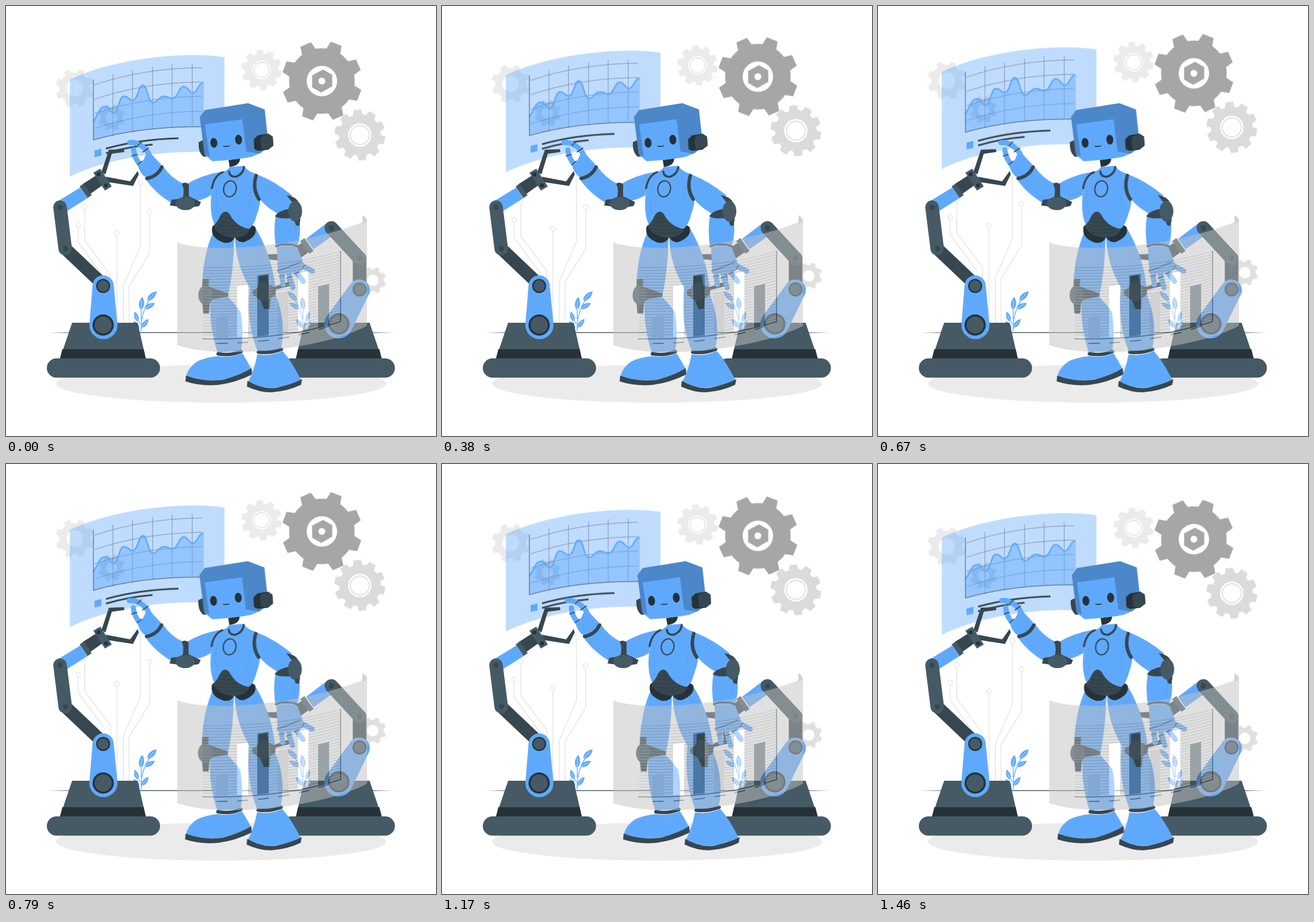
Write an HTML page without scripts that moves like this. It is 748x748 px and loops after 1.5 s.

```html
<!DOCTYPE html>
<html lang="en">
<head>
<meta charset="utf-8">
<title>Robot factory</title>
<style>
html, body { margin: 0; width: 100%; height: 100%; overflow: hidden; background: #fff; }
svg { display: block; width: 100%; height: 100%; }
.float { animation: float 1.5s linear -24ms infinite; }
.shake { animation: shake 1.5s linear -24ms infinite; }
@keyframes float {
  0%, 100% { transform: translateY(.5px); }
  50% { transform: translateY(-14.5px); }
}
@keyframes shake {
  0%, 100% { transform: translateX(.3px); }
  10%, 90% { transform: translateX(-1.2px); }
  20%, 80% { transform: translateX(3.3px); }
  30%, 50%, 70% { transform: translateX(-5.7px); }
  40%, 60% { transform: translateX(6.3px); }
}
.blue { fill: #5fa9fd; }
.shade { fill: #4c87ca; }
.steel { fill: #455a64; }
.dark { fill: #37474f; }
.ink { fill: #263238; }
.line { fill: none; stroke: #263238; stroke-width: .8; }
.band { fill: none; stroke: #37474f; stroke-width: 6; stroke-linecap: round; }
.finger { fill: none; stroke: #5fa9fd; stroke-width: 9; stroke-linecap: round; stroke-linejoin: round; }
.seam { fill: none; stroke: #4c87ca; stroke-width: 1; stroke-dasharray: 2 4; }
.joint { fill: none; stroke: #37474f; stroke-width: 1.6; stroke-linecap: round; }
.thin { stroke-width: 3.5; }
.axis { stroke-width: 1.6; }
</style>
</head>
<body>
<svg viewBox="0 0 748 748">
<defs>
  <path id="bar" d="M-10-69.500H10L13-55V55L10 69.500H-10L-13 55V-55Z"/>
  <g id="gear8">
    <circle r="57"/>
    <use href="#bar" transform="rotate(21)"/><use href="#bar" transform="rotate(66)"/>
    <use href="#bar" transform="rotate(111)"/><use href="#bar" transform="rotate(156)"/>
  </g>
  <g id="gear10">
    <circle r="57"/>
    <use href="#bar"/><use href="#bar" transform="rotate(36)"/>
    <use href="#bar" transform="rotate(72)"/><use href="#bar" transform="rotate(108)"/>
    <use href="#bar" transform="rotate(144)"/>
  </g>
  <g id="holed"><use href="#gear8"/><circle r="30" fill="#fff"/></g>
  <g id="ringed">
    <use href="#gear10" transform="rotate(-6)"/><circle r="32" fill="#fff"/>
    <circle r="26" fill="none" stroke="#dbdbdb" stroke-width="2.5"/>
  </g>

  <g id="leaf">
    <path class="blue" d="M0 0C-6-5-6-15 1-23C6-15 6-6 0 0Z"/>
    <path d="M0 0V-17" stroke="#fff" stroke-width=".7"/>
  </g>
  <g id="plant">
    <path d="M235 566Q234 532 252 508M235 545Q236 530 234 520M235 562Q238 552 242 549M234 553Q229 547 226 541" fill="none" stroke="#5fa9fd" stroke-width="1.3"/>
    <use href="#leaf" transform="translate(246 513) rotate(42)"/>
    <use href="#leaf" transform="translate(235 529) rotate(3)"/>
    <use href="#leaf" transform="translate(241 527) rotate(58) scale(.9)"/>
    <use href="#leaf" transform="translate(230 549) rotate(-22) scale(.8)"/>
    <use href="#leaf" transform="translate(236 560) rotate(35) scale(.85)"/>
    <use href="#leaf" transform="translate(232 562) rotate(-38) scale(.75)"/>
  </g>

  <g id="base">
    <path class="steel" d="M-54 551H60L74 613H-75Z"/>
    <path class="ink" d="M-71 597H70.500L74 613H-75Z"/>
    <rect class="steel" x="-98" y="613" width="197" height="33.500" rx="16.700"/>
  </g>
  <g id="pivot"><circle class="ink" r="18.500"/><circle class="steel" r="15"/></g>

  <path id="rule" class="line" d="M343 455Q480 457 581 427"/>
  <g id="rules2"><use href="#rule"/><use href="#rule" y="5.100"/></g>
  <g id="rules4"><use href="#rules2"/><use href="#rules2" y="10.200"/></g>
  <g id="rules8"><use href="#rules4"/><use href="#rules4" y="20.400"/></g>

  <path id="gridline" d="M154 137Q240 108 341 107"/>
  <path id="wave" d="M152 200C160 190 162 175 172 175S181 186 187 186C196 186 196 157 205 157S214 165 221 164C230 162 230 138 238 138C247 138 246 168 256 168C264 168 266 157 274 157C282 156 284 161 290 161C299 160 301 140 309 140C317 140 319 152 326 151C334 149 334 134 344 133"/>
  <clipPath id="below"><path d="M152 100H344V210Q235 209 152 233Z"/></clipPath>
  <linearGradient id="fade">
    <stop offset="0" stop-color="#263238" stop-opacity="0"/>
    <stop offset=".08" stop-color="#263238"/><stop offset=".92" stop-color="#263238"/>
    <stop offset="1" stop-color="#263238" stop-opacity="0"/>
  </linearGradient>
</defs>

<rect width="748" height="748" fill="#fff"/>
<ellipse cx="374" cy="657" rx="287" ry="33" fill="#ebebeb"/>

<!-- floating gears, circuit and chart -->
<g class="float">
  <g fill="#a6a6a6" transform="translate(549.500 130.500)">
    <use href="#gear8"/><circle r="26.500" fill="#fff"/>
    <path d="M-17-10L2-20L18-11V9L-1 20L-17 11Z"/><circle r="6" fill="#fff"/>
  </g>
  <use href="#ringed" fill="#dbdbdb" transform="translate(615.500 224.500) scale(.635)"/>
  <use href="#ringed" fill="#ebebeb" transform="translate(444.500 111) scale(.505)"/>
  <use href="#holed" fill="#ebebeb" transform="translate(119.500 143) scale(.48)"/>
  <use href="#holed" fill="#d4d4d4" transform="translate(183.500 194) scale(.335)"/>
  <use href="#holed" fill="#e0e0e0" transform="translate(638 477) scale(.335)"/>
  <g fill="none" stroke="#e6e6e6" stroke-width="1.500">
    <path d="M137 353V408L182 468V560M125.500 384V411L172 474M193 399V565M234 311V417L204 487V565M250 361V430L214 488V565"/>
    <circle cx="137" cy="349" r="4"/><circle cx="125.500" cy="380" r="4"/>
    <circle cx="193" cy="395" r="4"/><circle cx="234" cy="307" r="4"/><circle cx="250" cy="357" r="4"/>
  </g>

  <path class="blue" opacity=".4" d="M111 128C185 92 310 78 380 89V258C310 246 185 260 111 297Z"/>
  <g class="line" opacity=".55">
    <path d="M186 118V226M220 111V220M255 105V213M289 101V210M324 101V208"/>
    <use href="#gridline"/><use href="#gridline" y="25"/><use href="#gridline" y="50"/><use href="#gridline" y="76"/>
  </g>
  <g clip-path="url(#below)">
    <path class="blue" opacity=".45" d="M152 200C160 190 162 175 172 175S181 186 187 186C196 186 196 157 205 157S214 165 221 164C230 162 230 138 238 138C247 138 246 168 256 168C264 168 266 157 274 157C282 156 284 161 290 161C299 160 301 140 309 140C317 140 319 152 326 151C334 149 334 134 344 133V240H152Z"/>
  </g>
  <use href="#wave" fill="none" stroke="#5fa9fd" stroke-width="2.500"/>
  <path class="line" d="M152 128V233Q235 209 344 210"/>
  <path class="blue" d="M154 251L166 248V260L154 263Z"/>
  <path d="M174 248Q230 232 300 230M174 256Q210 245 255 241" fill="none" stroke="#37474f" stroke-width="3"/>
</g>

<rect x="75" y="567.500" width="600" height="1.200" fill="url(#fade)"/>
<use href="#plant"/>

<!-- left machine arm -->
<use href="#base" x="169"/>
<path d="M103 422L161 477" stroke="#37474f" stroke-width="22" stroke-linecap="round"/>
<path class="blue" d="M88 341L129 316L142 334L101 360Z"/>
<path d="M94 350L103 422" stroke="#455a64" stroke-width="23.500" stroke-linecap="round"/>
<circle class="dark" cx="94" cy="350" r="4.500"/><circle class="dark" cx="103.500" cy="422" r="4.500"/>
<path class="dark" d="M133 310L158 294L169 311L145 328Z"/>
<path class="steel" d="M128 314L135 309L149 329L142 334Z"/>
<path class="dark" d="M166 289L179 250L205 249L206 254L184 257L173 293ZM174 297L216 305L229 287L231 293L221 313L175 306Z"/>
<path class="steel" d="M152 290L164 283L184 314L172 321Z"/>
<circle class="ink" cx="161" cy="293" r="3.500"/><circle class="ink" cx="174" cy="312" r="3.500"/>
<path class="blue" d="M150.500 487A18.500 18.500 0 0 1 187.500 487L194 555A24.500 24.500 0 1 1 145 555Z"/>
<use href="#pivot" transform="translate(169 487) scale(.66)"/>
<use href="#pivot" transform="translate(169 555)"/>

<!-- right machine arm -->
<use href="#base" transform="translate(578.500 0) scale(-1 1)"/>
<path d="M615 439V491" stroke="#37474f" stroke-width="23.500" stroke-linecap="round"/>
<path class="blue" d="M560 376L522 405L535 423L573 396Z"/>
<path d="M566 386L615 439" stroke="#455a64" stroke-width="23.500" stroke-linecap="round"/>
<circle class="dark" cx="566" cy="386" r="4.500"/><circle class="dark" cx="615" cy="439" r="4.500"/>
<path class="dark" d="M516 411L490 429L502 446L528 427ZM494 431L450 432V440L486 444ZM486 445L490 480L462 490L464 495L498 486L494 445Z"/>
<path class="steel" d="M512 409L519 404L535 426L528 431Z"/>
<path class="blue" d="M599 484A18.500 18.500 0 0 1 632 500L600 566A24.500 24.500 0 1 1 557 541Z"/>
<use href="#pivot" transform="translate(615 493) scale(.66)"/>
<use href="#pivot" transform="translate(579 553)"/>
<use href="#plant" transform="translate(752 0) scale(-1 1)"/>

<!-- robot -->
<g class="shake">
  <!-- left leg -->
  <path class="blue" d="M360 394Q344 430 341 482L356 505Q352 555 368 603L409 600Q414 565 408 532Q398 518 386 506Q396 460 397 405Z"/>
  <path class="dark" d="M342 475H353L352 488L386 500L387 505L355 511L353 535H343L341 512V490Z"/>
  <ellipse class="steel" cx="347" cy="503" rx="12.500" ry="17"/>
  <path class="band" d="M369 605Q390 609 409 601"/>
  <path class="blue" d="M369 609Q390 613 411 604Q420 618 427 632Q402 646 376 650Q340 655 313 645Q317 628 333 618Q348 611 369 609Z"/>
  <path class="dark" d="M313 643Q345 655 378 650Q408 642 427 630L428 641Q400 655 370 659Q340 662 312 653Z"/>
  <!-- right leg -->
  <path class="blue" d="M398 403Q400 450 424 490Q417 550 438 602L478 598Q488 550 470 505Q466 440 435 388Z"/>
  <path class="dark" d="M440 470L455 468L457 485L470 490L468 503L460 508L459 527H449L443 512L429 502V495L440 489Z"/>
  <ellipse class="steel" cx="449" cy="497" rx="13" ry="17"/>
  <path class="band" d="M439 602Q460 605 479 597"/>
  <path class="blue" d="M437 606Q460 610 481 600Q497 618 513 650Q490 662 465 664Q440 664 421 654Q432 634 437 606Z"/>
  <path class="dark" d="M420 652Q445 667 470 664Q495 659 515 649L513 659Q490 670 462 672Q440 672 419 662Z"/>

  <!-- torso -->
  <path class="ink" d="M359 383Q354 404 380 412Q394 413 398 402Q403 411 413 411Q438 402 434 385Q425 376 415 384L372 379Z"/>
  <path class="blue" d="M374 289Q360 300 357 330Q354 360 362 379L420 389Q430 386 436 364Q443 345 443 328Q446 305 436 292Q420 288 414 278L389 280Q385 287 374 289Z"/>
  <path class="dark" d="M360 382Q367 378 372 366Q380 352 389 362Q400 384 424 388Q420 402 396 403Q370 402 360 382Z"/>
  <path class="line" opacity=".6" d="M374 367Q382 370 391 368M371 374Q383 377 396 375M368 381Q385 385 402 381M366 387Q388 392 411 387M370 393Q390 398 415 393"/>
  <path class="ink" d="M387 268L407 265Q407 278 389 280Z"/>
  <path class="band thin" d="M388 288Q389 298 400 297Q413 292 414 280"/>
  <ellipse cx="389.500" cy="318" rx="11" ry="14" transform="rotate(10 389.500 318)" fill="none" stroke="#37474f" stroke-width="2.200"/>
  <path class="seam" d="M426 318Q425 350 415 372M366 320Q364 345 368 360M428 408Q450 440 452 462M387 412Q388 440 382 470"/>

  <!-- raised arm -->
  <path class="blue" d="M376 288Q340 294 314 310L316 339Q335 342 357 329Q360 303 376 288Z"/>
  <path class="band thin" d="M377 289Q362 295 358 317"/>
  <path class="blue" d="M242 300Q260 327 292 345L306 334Q312 322 308 309Q288 300 274 280Z"/>
  <path class="seam" d="M262 311Q275 327 291 333M334 330Q345 328 354 323"/>
  <path class="dark" d="M306 309Q312 305 318 310L318 331L339 341L336 348L317 351L285 347L288 337L306 335Q312 322 306 309Z"/>
  <ellipse class="steel" cx="312" cy="343.500" rx="17" ry="11.500"/>
  <path class="blue" d="M243 298Q231 290 229 274L239 268L247 250Q257 263 270 276Q264 295 243 298Z"/>
  <path class="finger" d="M215 237.500Q234 236 248 256"/>
  <path class="finger" d="M222 250Q223 266 236 279"/>
  <path class="joint" d="M229 243L236 236M219 261L228 258M238 254L248 247M229 276L236 270"/>
  <path class="band" d="M245 300Q264 296 271 280"/>

  <!-- lowered arm -->
  <path class="blue" d="M437 293Q468 305 497 329L496 355L472 361Q450 348 440 334Q434 312 437 293Z"/>
  <path class="band" d="M435 295Q428 318 440 336"/>
  <path class="blue" d="M469 365Q480 370 496 363L511 378Q513 398 507 417L469 417Q465 390 469 365Z"/>
  <path class="seam" d="M455 312Q472 321 484 332M503 383Q503 399 498 410"/>
  <path class="dark" d="M468 366Q472 357 492 353L498 342L488 329Q504 331 510 343L512 372L510 383L504 381L500 368Q480 372 468 366Z"/>
  <ellipse class="steel" cx="503" cy="357" rx="12" ry="18"/>
  <path class="blue" d="M471 420Q490 414 507 420L517 446L514 461Q492 468 473 465Z"/>
  <path class="finger" d="M510 449L533 461M479 461L482 485M491 463L499 490M503 460L517 479"/>
  <path class="joint" d="M472 461Q492 455 512 445M475 471L485 469M488 474L497 470M501 467L509 462M515 458L519 451"/>
  <path class="band thin" d="M470 418Q488 411 507 418"/>

  <!-- head -->
  <path class="dark" d="M335 237L343 233L355 262L343 262Q334 254 335 237Z"/>
  <path class="blue" d="M344 204L412 194L420 252L446 254L428 262Q405 267 359 270L346 259Z"/>
  <path class="shade" d="M337 193L346 181L421 169L450 180L455 226L452 249L440 257L418 253L411 197L346 206L354 262L345 257Z"/>
  <path class="ink" d="M431 232L438 225L456 222L464 228L465 243L456 250L438 252L432 249Z"/>
  <path class="dark" d="M444 227L456 222L464 227L465 243L457 248L445 250L442 236Z"/>
  <g class="ink">
    <ellipse cx="361.500" cy="238" rx="6" ry="8.500" transform="rotate(-6 361.500 238)"/>
    <ellipse cx="404.500" cy="232.500" rx="6" ry="8.500" transform="rotate(-6 404.500 232.500)"/>
  </g>
  <path class="line axis" d="M378 243.500Q384 245.500 389 243"/>
</g>

<!-- translucent screen in front -->
<g opacity=".5">
  <path fill="#c2c2c2" d="M298 411C340 429 500 425 628 373V556C560 594 380 618 298 590Z"/>
  <path fill="#a6a6a6" d="M620 364Q627 367 628 374L620 380Z"/>
  <g opacity=".5">
    <use href="#rules8"/><use href="#rules8" y="40.800"/><use href="#rules8" y="81.600"/>
  </g>
  <path fill="#a6a6a6" d="M366 541L386 538V577H366ZM473 500L491 497V571L473 574Z"/>
  <path fill="#fff" d="M402 487L421 485V576H402ZM508 465L526 461V563L508 567Z"/>
  <path class="dark" d="M437 469L457 466V573L437 575ZM543 488L562 483V554L543 559Z"/>
  <path class="line axis" d="M582 426V549Q480 582 341 579"/>
  <path class="line axis" stroke-dasharray="19 17" d="M366 587Q480 586 562 557"/>
</g>
</svg>
</body>
</html>
```
